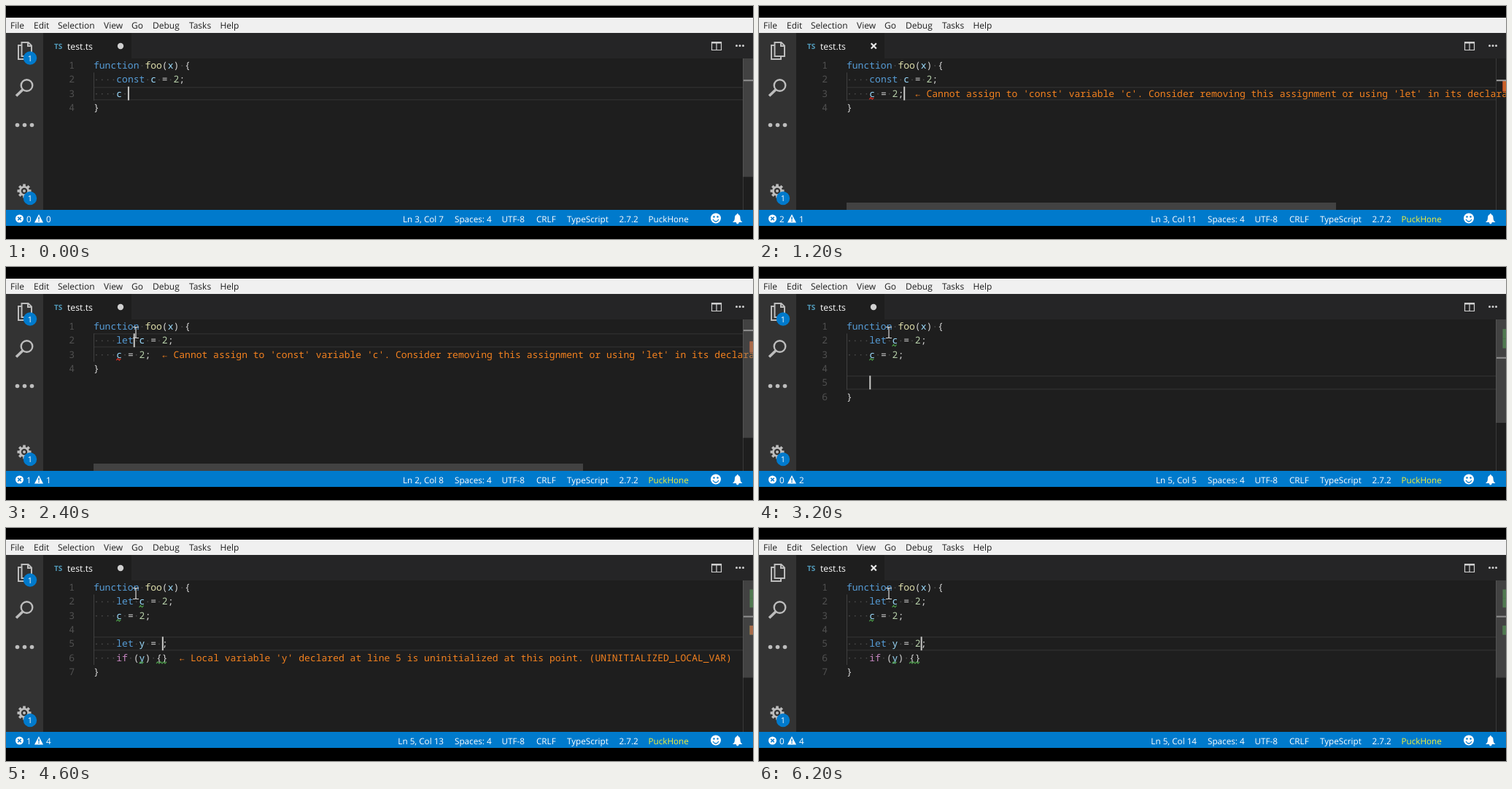
Write an HTML page with a canvas that moves like this. It is 1024 px wide and 320 px high and loops after 6.4 s.

```html
<!DOCTYPE html>
<html lang="en">
<head>
<meta charset="utf-8">
<title>Editor</title>
<style>
html, body { margin: 0; width: 100%; height: 100%; overflow: hidden; background: #000; }
canvas { display: block; }
</style>
</head>
<body>
<canvas id="stage" width="1024" height="320"></canvas>
<script>
const ctx = document.getElementById('stage').getContext('2d');
const LOOP = 6400, CELL = 7.82, ROW = 19.33, LEFT = 120, TOP = 72, VIEW = 208;
const UI = '"Open Sans", "Noto Sans", sans-serif';
const MONO = '13.03px "Noto Sans Mono", "DejaVu Sans Mono", monospace';
const RED = '#d93025', GREEN = '#4b9a48', ORANGE = '#f5821f', BLUE = '#007acc', ICON = '#bdbdbd';

const constNote = "← Cannot assign to 'const' variable 'c'. Consider removing this assignment or using 'let' in its declaration.";
const localNote = "← Local variable 'y' declared at line 5 is uninitialized at this point. (UNINITIALIZED_LOCAL_VAR)";
const unused = [[2, 9, 1, GREEN], [3, 5, 1, GREEN]];
const checked = [...unused, [6, 9, 1, GREEN], [6, 12, 2, GREEN]];
const assigned = ['let c = 2;', 'c = 2;'];
const withIf = decl => [...assigned, '', decl, 'if (y) {}'];

// Each step lists only what changes from the step before it.
const steps = [
  [0, { body: ['const c = 2;', 'c '], pos: [3, 7], dirty: true, errors: 0, warnings: 0,
        caret: true, slider: true, squiggles: [] }],
  [200, { body: ['const c = 2;', 'c ='], pos: [3, 8] }],
  [400, { body: ['const c = 2;', 'c = 2'], pos: [3, 10] }],
  [600, { body: ['const c = 2;', 'c = 2;'], pos: [3, 11], slider: false }],
  [800, { dirty: false, errors: 1, caret: false, squiggles: [[3, 5, 1, RED]] }],
  [1000, { caret: true }],
  [1200, { errors: 2, warnings: 1, alert: true, note: [3, constNote] }],
  [1400, { caret: false, slider: true, mouse: [196, 117] }],
  [1600, { mouse: [175, 105] }],
  [1800, { pos: [2, 10], selected: 5 }],
  [2000, { body: ['l c = 2;', 'c = 2;'], pos: [2, 6], selected: 0, dirty: true, caret: true, mouse: [178, 90] }],
  [2200, { body: ['le c = 2;', 'c = 2;'], pos: [2, 7] }],
  [2400, { body: assigned, pos: [2, 8], errors: 1 }],
  [2800, { dirty: false, errors: 0 }],
  [3000, { warnings: 2, note: null, squiggles: unused, pos: [3, 11] }],
  [3200, { body: [...assigned, '', ''], pos: [5, 5], dirty: true }],
  [3400, { body: [...assigned, '', 'let y;'], pos: [5, 11] }],
  [3600, { body: [...assigned, '', 'let y;', 'if (y)'], pos: [6, 11], errors: 1,
           squiggles: [...unused, [7, 1, 1, RED]] }],
  [3800, { body: withIf('let y;'), pos: [6, 14], dirty: false, caret: false, brackets: true }],
  [4000, { caret: true, warnings: 4, note: [6, localNote], squiggles: checked }],
  [4200, { pos: [5, 10], brackets: false }],
  [4400, { body: withIf('let y =;'), pos: [5, 12], dirty: true }],
  [4600, { body: withIf('let y = ;'), pos: [5, 13] }],
  [4800, { body: withIf('let y = 2;'), pos: [5, 14] }],
  [5000, { dirty: false }],
  [5200, { errors: 0, note: null }],
  [5600, { caret: false }],
  [6000, { caret: true }]
];

const rowTop = line => TOP + (line - 1) * ROW;
const colX = col => LEFT + (col - 1) * CELL;

function stateAt(time) {
  const state = {};
  for (const [start, change] of steps) if (start <= time) Object.assign(state, change);
  return state;
}

function rect(x, y, w, h, color) {
  ctx.fillStyle = color;
  ctx.fillRect(x, y, w, h);
}

function text(str, x, y, color, font, align = 'left') {
  ctx.font = font;
  ctx.fillStyle = color;
  ctx.textAlign = align;
  ctx.fillText(str, x, y);
}

function disc(x, y, r, color) {
  ctx.fillStyle = color;
  ctx.beginPath();
  ctx.arc(x, y, r, 0, Math.PI * 2);
  ctx.fill();
}

function shape(path, color, width) {
  const p = new Path2D(path);
  if (width) {
    ctx.strokeStyle = color;
    ctx.lineWidth = width;
    ctx.stroke(p);
  } else {
    ctx.fillStyle = color;
    ctx.fill(p);
  }
}

function badge(x, y) {
  disc(x, y, 9.2, BLUE);
  text('1', x, y + 4, '#fff', '11px ' + UI, 'center');
}

function gear(x, y) {
  ctx.save();
  ctx.translate(x, y);
  for (let i = 0; i < 8; i++) {
    rect(-1.8, -9.5, 3.6, 5, ICON);
    ctx.rotate(Math.PI / 4);
  }
  ctx.restore();
  disc(x, y, 7, ICON);
  disc(x, y, 4.2, '#333333');
  disc(x, y, 2, ICON);
}

function drawMenu() {
  rect(0, 16, 1024, 21, '#f0f0f0');
  const items = { File: 6, Edit: 38, Selection: 71, View: 134, Go: 172, Debug: 201, Tasks: 251, Help: 293.5 };
  for (const name in items) text(name, items[name], 30.5, '#1e1e1e', '12px ' + UI);
}

function drawSidebar(s) {
  rect(0, 37, 51, 243, '#333333');
  shape('M21 54 H17 V73 H30 V69.5 M21.5 50 H30.5 L35 54.5 V69 H21.5 Z M30 50 V55 H35', ICON, 2);
  shape('M36.3 109 A7.8 7.8 0 1 1 20.7 109 A7.8 7.8 0 1 1 36.3 109', ICON, 2.4);
  shape('M22.8 115 L14 123.5', ICON, 3.6);
  for (const x of [15.5, 25.5, 35.5]) disc(x, 163.5, 2.8, ICON);
  gear(25, 254);
  badge(33, 264);
  if (s.dirty) badge(33, 71.5);
}

function drawTabs(s) {
  rect(51, 37, 973, 35, '#252526');
  rect(51, 37, 121, 35, '#1e1e1e');
  text('TS', 66, 58.5, '#519aba', 'bold 10px ' + UI);
  text('test.ts', 84, 59.5, '#ffffff', '12.3px ' + UI);
  if (s.dirty) disc(157, 55, 4.2, '#d0d0d0');
  else shape('M153.7 51.2 L160.8 58.6 M160.8 51.2 L153.7 58.6', '#e8e8e8', 2.2);
  shape('M967.5 49.5 H980.5 V60.5 H967.5 Z M974 49 V61', '#d0d0d0', 1.2);
  rect(967, 49, 14, 2.5, '#d0d0d0');
  for (const x of [1001.5, 1006, 1010.5]) disc(x, 54.5, 1.5, '#d0d0d0');
}

function tokenColor(token) {
  if (/^(function|const|let)$/.test(token)) return '#569cd6';
  if (token === 'if') return '#c586c0';
  if (token === 'foo') return '#dcdcaa';
  if (/\d/.test(token)) return '#b5cea8';
  return /[a-z]/.test(token) ? '#9cdcfe' : '#d4d4d4';
}

function drawLine(code, line) {
  const base = rowTop(line) + 14;
  text(line, 94, base, '#505050', MONO, 'right');
  for (const match of code.matchAll(/[a-z]+|./g)) {
    const x = colX(match.index + 1);
    if (match[0] === ' ') rect(x + 3.2, base - 4.7, 1.5, 1.5, '#4c4c4c');
    else text(match[0], x, base, tokenColor(match[0]), MONO);
  }
}

function squiggle([line, col, length, color]) {
  const y = rowTop(line) + 16.3, start = colX(col), end = start + length * CELL;
  ctx.beginPath();
  for (let x = start, i = 0; x <= end; x += 2, i++) ctx.lineTo(x, y + (i % 2 ? -1.2 : 1.2));
  ctx.strokeStyle = color;
  ctx.lineWidth = 1.2;
  ctx.stroke();
}

function drawRuler(s, count) {
  const [line] = s.pos;
  const scale = VIEW / ((count - 1) * ROW + VIEW);
  const markY = n => TOP + (n - 1) * ROW * scale;
  const mark = (n, x, w, color) => rect(x, markY(n), w, ROW * scale, color);
  rect(1010, TOP, 1, VIEW, '#3a3a3a');
  for (const [n, , , color] of s.squiggles) mark(n, 1019.5, 4.5, color === GREEN ? '#357a35' : '#c4201c');
  if (s.note) mark(s.note[0], 1019.5, 4.5, '#c9622a');
  if (s.brackets) mark(line, 1015, 4.5, '#a0a0a0');
  rect(1011, markY(line) - 1, 13, 2, '#a0a0a0');
  if (s.slider) rect(1010, TOP, 14, VIEW * scale, 'rgba(121,121,121,0.4)');
}

function drawMouse([x, y]) {
  const beam = `M${x - 4} ${y - 7.5} H${x - 1} L${x} ${y - 6.5} L${x + 1} ${y - 7.5} H${x + 4}
    M${x} ${y - 6.5} V${y + 6.5} M${x - 4} ${y + 7.5} H${x - 1} L${x} ${y + 6.5} L${x + 1} ${y + 7.5} H${x + 4}`;
  shape(beam, '#d8d8d8', 1.2);
}

function drawEditor(s) {
  const lines = ['function foo(x) {', ...s.body.map(l => l && '    ' + l), '}'];
  const [line, col] = s.pos;
  rect(51, TOP, 973, VIEW, '#1e1e1e');
  if (s.selected) {
    rect(colX(col - s.selected), rowTop(line), s.selected * CELL, ROW, '#264f78');
  } else {
    rect(LEFT, Math.round(rowTop(line)), 890, 1.5, '#2d2d2d');
    rect(LEFT, Math.round(rowTop(line + 1)) - 2, 890, 1.5, '#2d2d2d');
  }
  rect(LEFT, rowTop(2), 1, s.body.length * ROW, '#404040');
  if (s.brackets) {
    ctx.strokeStyle = '#888888';
    ctx.lineWidth = 1;
    for (const c of [12, 13]) ctx.strokeRect(colX(c) + 0.5, rowTop(line) + 0.5, CELL - 0.5, ROW - 2);
  }
  lines.forEach((code, i) => drawLine(code, i + 1));
  s.squiggles.forEach(squiggle);
  if (s.note) {
    const [n, message] = s.note;
    text(message, colX(lines[n - 1].length + 3), rowTop(n) + 14, ORANGE, MONO);
    if (message === constNote) rect(LEFT, 270, 671, 10, '#424242');
  }
  if (s.caret) rect(colX(col), rowTop(line), 2, ROW - 0.5, '#c8c8c6');
  drawRuler(s, lines.length);
  if (s.mouse) drawMouse(s.mouse);
}

function drawStatus(s) {
  const font = '11.7px ' + UI;
  const label = (str, x, color = '#fff', align) => text(str, x, 296.5, color, font, align);
  rect(0, 280, 1024, 22, BLUE);
  disc(18.5, 292, 5.5, '#fff');
  shape('M16.2 289.7 L20.8 294.3 M20.8 289.7 L16.2 294.3', BLUE, 1.6);
  label(s.errors, 28);
  shape('M45 286 L51 297.5 H39 Z', '#fff');
  rect(44.3, 289.5, 1.5, 4, BLUE);
  rect(44.3, 294.5, 1.5, 1.5, BLUE);
  label(s.warnings, 55);
  const picked = s.selected ? ` (${s.selected} selected)` : '';
  label(`Ln ${s.pos[0]}, Col ${s.pos[1]}${picked}`, 600, '#fff', 'right');
  label('Spaces: 4', 615);
  label('UTF-8', 679.5);
  label('CRLF', 727);
  label('TypeScript', 769);
  label('2.7.2', 840.5);
  label('PuckHone', 880.5, s.alert ? '#f4f03a' : '#fff');
  disc(973, 291.5, 7, '#fff');
  disc(970.5, 289.5, 1.2, BLUE);
  disc(975.5, 289.5, 1.2, BLUE);
  shape('M969 293 Q973 299 977 293', BLUE, 1.3);
  shape('M996 297 Q999 295 999 290.5 Q999 287 1002 286 V285 H1003.5 V286 Q1006.5 287 1006.5 290.5 Q1006.5 295 1009.5 297 Z', '#fff');
  disc(1002.8, 297.6, 1.8, '#fff');
}

function frame(now) {
  const s = stateAt(now % LOOP);
  rect(0, 0, 1024, 320, '#000');
  drawMenu();
  drawTabs(s);
  drawEditor(s);
  drawSidebar(s);
  drawStatus(s);
  requestAnimationFrame(play);
}

const begin = performance.now();
function play() {
  frame(performance.now() - begin);
}

ctx.textRendering = 'geometricPrecision';
play();
</script>
</body>
</html>
```
